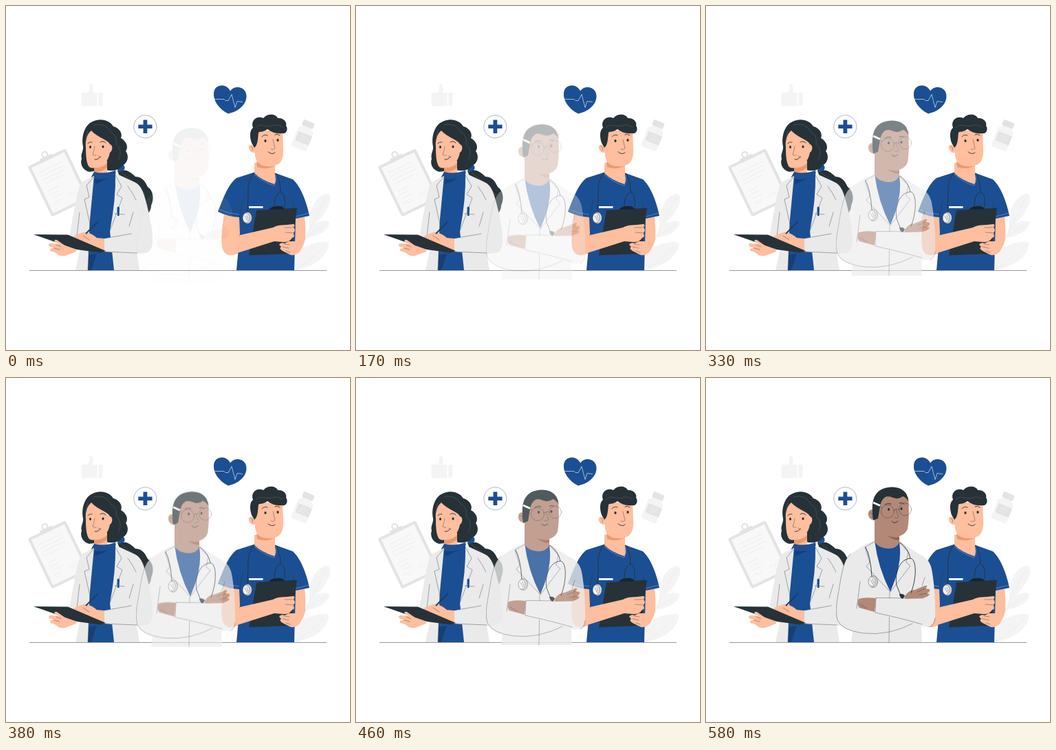
Recreate the animation shown at these times as an HTML page without scripts. Size 500x500 px, loop 620 ms.

```html
<!DOCTYPE html>
<html lang="en">
<head>
<meta charset="utf-8">
<title>Medical team</title>
<style>
html, body { margin: 0; width: 100%; height: 100%; overflow: hidden; background: #fff; }
svg { display: block; width: 100%; height: 100%; }
.blue { fill: #1b4f93; }
.dark { fill: #263238; }
.coat { fill: #eaeaea; }
.skin { fill: #ffbe9d; }
.shade { fill: #eb996e; }
.tan { fill: #b38876; }
.tan-shade { fill: #99604c; }
.pale { fill: #f4f4f4; }
.gray { fill: #e3e3e3; }
.line, .thin, .hair { fill: none; stroke: #263238; stroke-linecap: round; stroke-linejoin: round; }
.line { stroke-width: .9; }
.thin { stroke-width: .4; }
.hair { stroke: #66757c; stroke-width: .4; }
.white { fill: none; stroke: #fff; stroke-width: .6; }
.faint { fill: none; stroke: #e4e4e4; stroke-width: .5; }
.rise { animation: rise 620ms steps(15, start) -2ms infinite; }
@keyframes rise { from { opacity: 0; transform: translateY(20px); } }
</style>
</head>
<body>
<svg viewBox="0 0 500 500">
  <defs>
    <g id="scope">
      <ellipse cx="1" rx="6.4" ry="8.4" fill="#d5d5d5" stroke="#263238" stroke-width=".5"/>
      <ellipse cx="-1" rx="5" ry="7" fill="#f2f2f2" stroke="#263238" stroke-width=".4"/>
      <path class="thin" d="M-3-3L1 4M0-4L2 2"/>
    </g>
  </defs>

  <!-- backdrop -->
  <g class="pale">
    <path d="M109.500 128Q110 125 113 125.500L119 126Q122 121 121 115Q122 112 125 114Q128 118 126 126L132.500 126V145L112 146Q109 145 109.500 142Z"/>
    <path d="M134.500 126H141L140 145H134.500Z"/>
    <path d="M421 350C432 345 438 336 441 321C439 297 450 276 465 273C473 273 474 284 466 295C461 306 454 314 443 320C453 312 464 311 470 314C470 325 456 334 437 337L428 354C440 346 457 341 469 344C470 361 449 379 424 383L419 384Z"/>
  </g>
  <path class="faint" d="M421 383Q447 367 462 350M425 354Q441 327 465 278M438 334L465 318"/>
  <g transform="translate(432 190) rotate(22)">
    <rect class="gray" x="-8.500" y="-24" width="17" height="9" rx="2"/>
    <path class="pale" d="M-7-15H7V-13Q12-12 12-8V16Q12 19 9 19H-9Q-12 19-12 16V-8Q-12-12-7-13Z"/>
    <rect class="gray" x="-9" y="-5" width="21" height="14"/>
    <path d="M-5-1H8M-5 2H8M-5 5H4" stroke="#eee" stroke-width=".8"/>
  </g>
  <g transform="translate(31.500 233.500) rotate(-25.700)">
    <circle cx="30" cy="-5" r="4" fill="none" stroke="#e0e0e0" stroke-width="2"/>
    <rect class="gray" width="61" height="81" rx="3"/>
    <rect x="4" y="4" width="53" height="73" fill="#f8f8f8"/>
    <rect class="gray" x="20" y="-2" width="20" height="6" rx="1"/>
    <path class="faint" d="M11 15H48M11 21H48M11 27H48M11 33H42M11 45H27M11 51H25M11 57H29M36 65q4-6 6-1t6-3M12 66q3-6 5-1t6-2"/>
  </g>

  <circle cx="202.300" cy="175.300" r="16.500" fill="#fff" stroke="#1b4f93" stroke-width=".4"/>
  <path class="blue" d="M199.500 165.500h5.800v6.900h7.200v5.700h-7.200v6.900h-5.800v-6.900h-7.200v-5.700h7.200Z"/>
  <g transform="translate(0 .5)">
    <path class="blue" d="M323 156C309 149 301 137 302 126C303 113 320 111 326 123C333 113 350 117 349.500 131C349 144 337 153 323 156Z"/>
    <path class="white" d="M303 135L317 135L319 137L323 137L328 128L333 147L336 138L344 139"/>
  </g>
  <path d="M34 384.500H466" stroke="#263238" stroke-width=".5"/>

  <!-- woman -->
  <g>
    <path class="dark" d="M162 239C175 237 180 240 188 248C199 248 203 257 206 263C215 269 215 282 211 290C211 297 207 302 203 303C203 294 198 287 192 278C182 264 166 256 162 239Z"/>
    <path class="hair" d="M168 242C181 254 195 259 203 276"/>
    <path class="blue" d="M161 235L169 230Q174 232 172 238L164 242Z"/>
    <path class="dark" d="M126 168C137 162 151 166 156 175C165 177 170 186 167 192C176 197 178 206 174 211C180 219 176 229 169 232C165 239 153 241 145 238L121 241C112 239 107 230 110 222C108 215 113 210 112 204C109 189 115 172 126 168Z"/>
    <path class="skin" d="M128 225H147V246Q138 251 128 246Z"/>
    <path class="shade" d="M128 235Q140 236 147 228V235Q138 242 128 242Z"/>
    <path class="skin" d="M124 181C118 186 115 194 116 205C116 219 117 229 121 234Q126 237 132 234C142 232 149 225 151 213C155 211 156 202 151 201C148 194 134 192 124 181Z"/>
    <path class="hair" d="M128 173C141 169 149 177 153 184C160 187 161 195 160 201C167 207 168 216 163 224M119 181Q116 188 117 195"/>
    <ellipse class="dark" cx="122.500" cy="205" rx="1.500" ry="2"/>
    <ellipse class="dark" cx="141" cy="204.500" rx="1.500" ry="2"/>
    <path class="line" d="M119 200Q121 197 125 198M137 198Q141 195 145 199"/>
    <path class="thin" d="M129 204Q128 211 126 216Q128 218 131 217M134 218L138 220"/>
    <path class="line" d="M129 223Q134 224 137 219"/>

    <path class="blue" d="M128 241Q143 245 159 239L161 250L157 300V384H119L121 320L122 252Z"/>
    <path d="M128 251Q145 254 157 247L130 259ZM120 362L132 360L124 384H119Z" fill="#153f76"/>
    <path class="coat" d="M128 247L112 255C104 260 102 285 96 313L92 337L108 352L101 384H119L122 310Z"/>
    <path class="coat" d="M159 243L187 256C197 260 201 274 205 290C210 311 214 331 213 346Q210 359 202 359L190 360L194 384H157L151 327Q160 280 159 243Z"/>
    <path class="thin" d="M127 249L117 261L121 278L114 281L122 317M159 246L168 262L161 274L169 279L151 327M158 302L172 303M177 262Q184 271 189 282M179 320L185 300M107 300L103 335M183 333L190 359M122 316L119 383"/>
    <path class="coat" d="M142 338L182 331Q204 326 211 338Q213 357 202 359Q173 361 142 357Z"/>
    <path class="thin" d="M182 331L142 338L142 357L190 359"/>
    <path class="blue" d="M161.500 293Q163 290 165 293L164.500 305H162Z"/>
    <path class="skin" d="M143 338L132 337C125 331 118 328 112 329L101 333L97 337L143 357Z"/>
    <path d="M134 313L116 331" stroke="#163e72" stroke-width="2"/>
    <path class="skin" d="M101 352L88 342L74 340Q69 340 71 343L78 346L64 345Q60 347 64 350L70 351L64 353Q63 357 69 357L74 360Q78 364 86 363L102 357Z"/>
    <path class="dark" d="M40 332L90 332.500L145 356L137 358.500L103 354Z"/>
    <path class="skin" d="M78 346L71 343Q69 339 74 340L84 347L90 352L82 355Z"/>
    <path class="thin" d="M73 347L80 350M70 352L78 354M112 334L121 340"/>
  </g>

  <!-- nurse -->
  <g>
    <path class="skin" d="M317 300C315 320 311 341 315 354Q319 364 330 362L391 343L388 321L344 332L342 301ZM422 308L434 306Q436 325 435 338Q432 352 424 357L414 347Z"/>
    <path class="blue" d="M360 242L335 250C322 260 315 282 308 299Q322 306 339 307L340 330L335 384H419L421 309L441 305C437 286 429 263 417 252L392 243Z"/>
    <path class="skin" d="M361 228H391V245Q393 255 390 259Q371 253 361 243Z"/>
    <path class="shade" d="M364 226Q378 236 391 232Q379 239 365 234Z"/>
    <path class="skin" d="M366 181C362 190 361 199 361 205C357 199 352 201 353 207Q355 214 362 213C361 226 369 233 380 233Q391 234 398 228Q404 221 403 207L402 181Z"/>
    <path class="dark" d="M361 206L357 199C354 190 354 181 359 177C355 166 365 159 374 163C380 155 393 157 395 163C403 162 409 169 407 174C411 179 407 187 401 185C392 186 386 183 380 179C374 184 368 182 367 184C366 193 366 202 361 206Z"/>
    <path class="hair" d="M363 177C368 169 380 177 387 174Q393 171 402 176"/>
    <ellipse class="dark" cx="377" cy="196" rx="1.600" ry="2.100"/>
    <ellipse class="dark" cx="395" cy="195" rx="1.600" ry="2.100"/>
    <path class="line" d="M372 190Q375 186 380 188M391 187Q395 185 398 188M381 212Q387 217 391 213"/>
    <path class="thin" d="M388 194L391 207Q388 210 385 208M356 204Q360 206 358 210"/>
    <path d="M361 245Q375 257 390 261Q394 254 392 245M308 295Q323 302 339 303M421 306L440 301" fill="none" stroke="#8faed3" stroke-width=".5"/>
    <path class="thin" d="M339 307L345 280M421 309L417 285"/>
    <path class="line" d="M361 242Q350 253 352 275L351 300M392 243Q399 253 399 270Q390 274 390 290M399 270Q407 273 405 292"/>
    <rect x="353" y="291" width="20.500" height="2.800" fill="#fff"/>
    <use href="#scope" x="350" y="308"/>
    <path class="dark" d="M364 297L423 293.500L414 360L353 362.500Z"/>
    <path d="M382 296Q386 291 393 291Q402 290 405 295Z" fill="#17252b"/>
    <path class="skin" d="M340 333L388 322C396 317 405 319 418 317Q421 319 418 321L420 326L418 330L419 335L415 338Q412 344 402 343L390 342L330 361Z"/>
    <path class="skin" d="M435 330Q436 344 427 357Q422 363 414 362L402 356Q396 352 400 350L397 347Q399 343 405 345L411 342L421 342Z"/>
    <path class="thin" d="M417 322L405 322M418 330L406 329M402 350L411 352M407 356L413 358M404 346L412 347"/>
  </g>

  <!-- doctor -->
  <g class="rise">
    <path class="blue" d="M245 238L281 237L284 270L268 311L243 265Z"/>
    <path class="tan" d="M245 203H281V239Q277 248 265 248Q250 247 245 238Z"/>
    <path class="tan-shade" d="M260 225Q271 234 281 231V236Q269 236 260 225Z"/>
    <path class="tan" d="M251 178L249 196C243 188 235 191 236 199Q237 207 246 206L250 212C252 224 262 231 274 231Q289 230 293 219Q296 203 294 173Q275 164 251 178Z"/>
    <path class="dark" d="M243 207C241 191 241 177 247 169C257 155 285 155 292 170L294.500 179Q290 173 286 172Q280 177 272 174C260 168 254 178 253 187L250 204Z"/>
    <path d="M243 181L253 185.500" stroke="#fff" stroke-width="3"/>
    <g class="thin">
      <circle cx="264" cy="194" r="9.500"/>
      <circle cx="289.500" cy="191" r="9"/>
      <path d="M253 186L256 189M273 192Q277 189 281 191M276 191L280 202Q277 205 274 203M239 196Q244 197 242 202"/>
    </g>
    <ellipse class="dark" cx="265.500" cy="191" rx="1.500" ry="2"/>
    <ellipse class="dark" cx="284" cy="190" rx="1.500" ry="2"/>
    <path class="line" d="M260 184Q264 181 269 183M281 182Q285 180 288 183M270 208Q273 213 279 208"/>

    <path class="coat" d="M245 236L231 242L210 256C199 264 196 292 192 315Q187 339 191 352Q195 364 213 368L211 384H314L313 361Q329 363 333 349C334 325 331 288 327 274Q323 261 310 256L282 238Q285 273 268 311Q250 276 245 236Z"/>
    <path class="thin" d="M245 238L231 246L238 268L233 274L267 310M281 239L294 253L291 268L297 273L268 311M267 311L266 384M224 296L219 335M318 290L314 302"/>
    <path class="thin" d="M210 256C199 264 196 292 192 315Q187 339 191 352Q198 367 229 371Q266 375 302 356"/>
    <path class="coat" d="M246 320L291 321L318 315L332 330Q335 356 326 361Q302 359 246 341Z"/>
    <path class="thin" d="M316 320L247 319.500L246 341Q287 350 314 358M326 361Q333 357 333 349"/>
    <path class="tan" d="M247 320Q231 318 222 321Q218 328 223 334L245 340Z"/>
    <path class="tan" d="M289 317Q295 308 303 308L318 302Q324 301 319 306L325 307Q326 311 321 313L325 314Q324 318 314 320L289 321Z"/>
    <path class="thin" d="M319 306L307 311M321 313L310 315M224 329L234 335"/>
    <path class="line" d="M282 239Q295 249 297 262M283 316L277 301C274 283 281 264 297 262C306 263 307 289 298 312M232 246Q239 258 241 288"/>
    <path class="dark" d="M281 314Q287 313 289 317L286 321Q282 320 281 314Z"/>
    <use href="#scope" x="242" y="296"/>
  </g>
</svg>
</body>
</html>
```
